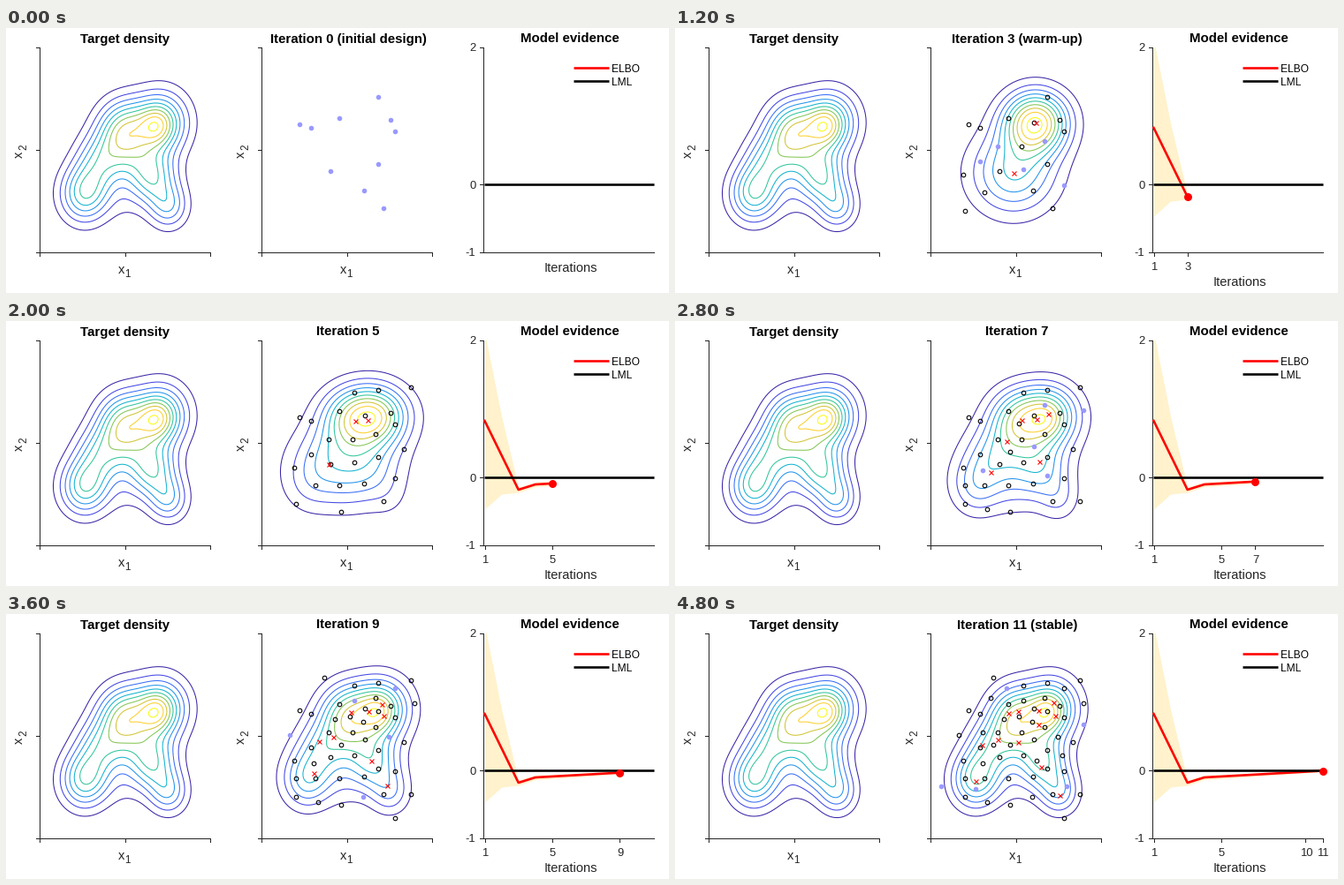
A matplotlib script that plays this animation: 750 px wide and 300 px high, repeating every 6 s.

```python
import numpy as np
import matplotlib.pyplot as plt
from matplotlib.animation import FuncAnimation
from matplotlib.colors import LinearSegmentedColormap
from matplotlib.patches import Rectangle

W, H, DPI = 750, 300, 75
PX = 72 / DPI                      # points per pixel
TOP, BOTTOM, MID = 22, 254, 138
LEFT_X, MID_X, RIGHT_X, PANEL_W = 38, 289, 540, 193
INK, NEW_POINT, BAND = "#262626", "#9999ff", "#fff2cc"
FRAMES, INTERVAL, LAST = 15, 400, 11
WARM_END = 4

PARULA = LinearSegmentedColormap.from_list("parula", [
    (.242, .150, .660), (.281, .323, .958), (.179, .529, .968),
    (.069, .695, .839), (.216, .784, .592), (.672, .779, .223),
    (.997, .766, .220), (.977, .984, .080)])

# Gaussian mixtures: (x, y, scale, height in contour steps)
TARGET = [
    (89, 188, 1, 5.6), (106, 152, 1, 4), (134, 117, 1.1, 6.9),
    (176, 107, 1.12, 5.9), (170, 111, .65, 2.8), (138, 146, 1, 1.2),
    (165, 168, 1, 5.4), (184, 202, .8, 3.5), (132, 197, .85, .55)]
WIDE = [(389, 151, 1, 3.5), (401, 170, 1, 3.5)]
PAIR = [(408, 107, 1, 9.7), (383, 164, 1.33, 5)]

DESIGN = [(332, 109), (345, 113), (377, 102), (421, 78), (435, 104),
          (440, 117), (367, 162), (421, 154), (405, 184), (427, 204)]
MEANS = np.array([
    (411, 109), (340, 189), (388, 110), (428, 100), (365, 142), (414, 173),
    (347, 148), (435, 205), (430, 115), (377, 112), (388, 145), (411, 125)])
CENTRE = np.array([405, 118])

ITERS = np.arange(1, LAST + 1)
ITER_X = 541.5 + 19.1 * (ITERS - 1)
ELBO = np.interp(ITERS, [1, 3, 4, LAST], [113, 191, 185, 177.5])
SPREAD = np.interp(ITERS, [1, 2, 3, LAST], [100, 44, 3, 1])

plt.rcParams["font.family"] = "Liberation Sans"
fig = plt.figure(figsize=(W / DPI, H / DPI), dpi=DPI, facecolor="white")
ax = fig.add_axes([0, 0, 1, 1])
ax.axis("off")


def field(x, y, mixture, sx, sy):
    return sum(h * np.exp(-(((x - mx) / sx) ** 2 + ((y - my) / sy) ** 2) / (2 * s * s))
               for mx, my, s, h in mixture)


def target(x, y, left=LEFT_X):
    return field(x - left + LEFT_X, y, TARGET, 19, 22)


def progress(k):
    return max(0, (k - WARM_END) / (LAST - WARM_END))


def posterior(x, y, k):
    if k < 3:
        return field(x, y, WIDE, 27.3, 74)
    w = progress(k)
    early = field(x, y, PAIR, 30 * min(1, (k + 2) / 6), 24)
    return (1 - w) * early + w * target(x, y, MID_X)


def means(k):
    """Components multiply and spread out after warm-up."""
    if k <= WARM_END:
        return [c[:2] for c in (WIDE if k < 3 else PAIR)]
    count = int(3 + 1.5 * (k - 5))
    return CENTRE + (MEANS[:count] - CENTRE) * (.55 + .45 * progress(k))


def panel_grid(left, n):
    return np.meshgrid(np.linspace(left, left + PANEL_W, n),
                       np.linspace(TOP, BOTTOM, n))


def acquire_all():
    """Each batch fills the widest gaps, favouring dense regions."""
    x, y = panel_grid(MID_X, 80)
    weight = target(x, y, MID_X) ** .3
    batches = [[], DESIGN]
    points = list(DESIGN)
    gap = np.min([np.hypot(x - px, y - py) for px, py in points], axis=0)
    for k in range(2, LAST + 1):
        size = 0 if k == WARM_END + 1 else 5   # no sampling right after warm-up
        for _ in range(size):
            i = np.argmax(gap * weight)
            p = x.flat[i], y.flat[i]
            points.append(p)
            gap = np.minimum(gap, np.hypot(x - p[0], y - p[1]))
        batches.append(points[len(points) - size:])
    return batches


def label(x, y, s, size=14.67, color=INK, ha="center", va="baseline", **kw):
    return ax.text(x, y, s, size=size * PX, color=color, ha=ha, va=va, **kw)


def title(x, s):
    return label(x, 16.5, s, 15, "black", weight="bold")


def line(xs, ys, color=INK, width=1, **kw):
    return ax.plot(xs, ys, color=color, lw=width * PX, **kw)[0]


def marks(points, marker, size, **kw):
    xs, ys = zip(*points)
    return ax.plot(xs, ys, marker, ms=size * PX, ls="none", **kw)[0]


def contours(density, left):
    x, y = panel_grid(left, 180)
    z = density(x, y)
    return ax.contour(x, y, z, levels=np.arange(1, z.max()), cmap=PARULA,
                      linewidths=1.05 * PX, zorder=2)


def axis_lines(left, y_ticks, x_ticks=()):
    line([left, left], [TOP, BOTTOM], zorder=3)
    line([left, left + PANEL_W], [BOTTOM, BOTTOM], zorder=3)
    for y in y_ticks:
        line([left - 4, left], [y, y], zorder=3)
    for x in x_ticks:
        line([x, x], [BOTTOM, BOTTOM + 4], zorder=3)


def density_panel(left):
    axis_lines(left, (TOP, MID, BOTTOM), (left, left + PANEL_W / 2, left + PANEL_W))
    label(left + 93, 278.5, "x")
    label(left + 99.5, 282.5, "1", 11.7)
    label(left - 23, 143, "x", rotation=90, va="center")
    label(left - 18, 135, "2", 11.7, rotation=90, va="center")


def evidence_panel():
    axis_lines(RIGHT_X, (TOP, 177, BOTTOM))
    for y, s in ((TOP, "2"), (177, "0"), (BOTTOM, "-1")):
        label(531.5, y + 4.5, s, 13, ha="right")
    line([541, 733], [177, 177], "black", 2.6, zorder=6, solid_capstyle="butt")
    for y, s, color in ((45, "ELBO", "red"), (60, "LML", "black")):
        line([642, 682], [y, y], color, 2.6, solid_capstyle="butt")
        label(685.5, y + 5, s, 12, "black", ha="left")
    title(637.5, "Model evidence")


density_panel(LEFT_X)
density_panel(MID_X)
evidence_panel()
title(135, "Target density")
contours(target, LEFT_X)
panel_clip = ax.add_patch(Rectangle((RIGHT_X, TOP), PANEL_W + 1, BOTTOM - TOP,
                                    fc="none", ec="none"))
ax.set_xlim(0, W)
ax.set_ylim(H, 0)
ax.set_autoscale_on(False)

BATCHES = acquire_all()
live = []


def note(step):
    if step == 0:
        return " (initial design)"
    if step < WARM_END:
        return " (warm-up)"
    return {WARM_END: " (end of warm-up)", LAST + 1: " (stable)"}.get(step, "")


def draw_evidence(k):
    xs, ys, spread = ITER_X[:k], ELBO[:k], SPREAD[:k]
    band = ax.fill_between(xs, ys - spread, ys + spread, color=BAND, lw=0, zorder=1)
    band.set_clip_path(panel_clip)
    live.append(band)
    live.append(line(xs, ys, "red", 2.6, zorder=5))
    live.append(marks([(xs[-1], ys[-1])], "o", 9, color="red", mew=0, zorder=7))
    for i in sorted({1, k} | {n for n in (5, 10) if n <= k}):
        x = ITER_X[i - 1]
        live.append(line([x, x], [BOTTOM, BOTTOM + 4], zorder=3))
        live.append(label(x + .5, 273.5, str(i), 13))


def draw(frame):
    while live:
        live.pop().remove()
    step = min(frame, LAST + 1)
    k = min(step, LAST)
    live.append(title(387, f"Iteration {k}{note(step)}"))
    live.append(label(638.5, 292.5 if k else 276.5, "Iterations"))

    shown = max(k, 1)
    old = sum(BATCHES[:shown], [])
    if old:
        live.append(marks(old, "o", 4.6, mfc="none", mec="black", mew=1.1 * PX, zorder=4))
    if BATCHES[shown]:
        live.append(marks(BATCHES[shown], "o", 5.6, color=NEW_POINT, mew=0, zorder=4))
    if k:
        live.append(contours(lambda x, y: posterior(x, y, k), MID_X))
        live.append(marks(means(k), "x", 5, color="red", mew=1.1 * PX, zorder=5))
        draw_evidence(k)
    return live


anim = FuncAnimation(fig, draw, frames=FRAMES, interval=INTERVAL,
                     repeat=True, repeat_delay=0, blit=False)
plt.show()
```
